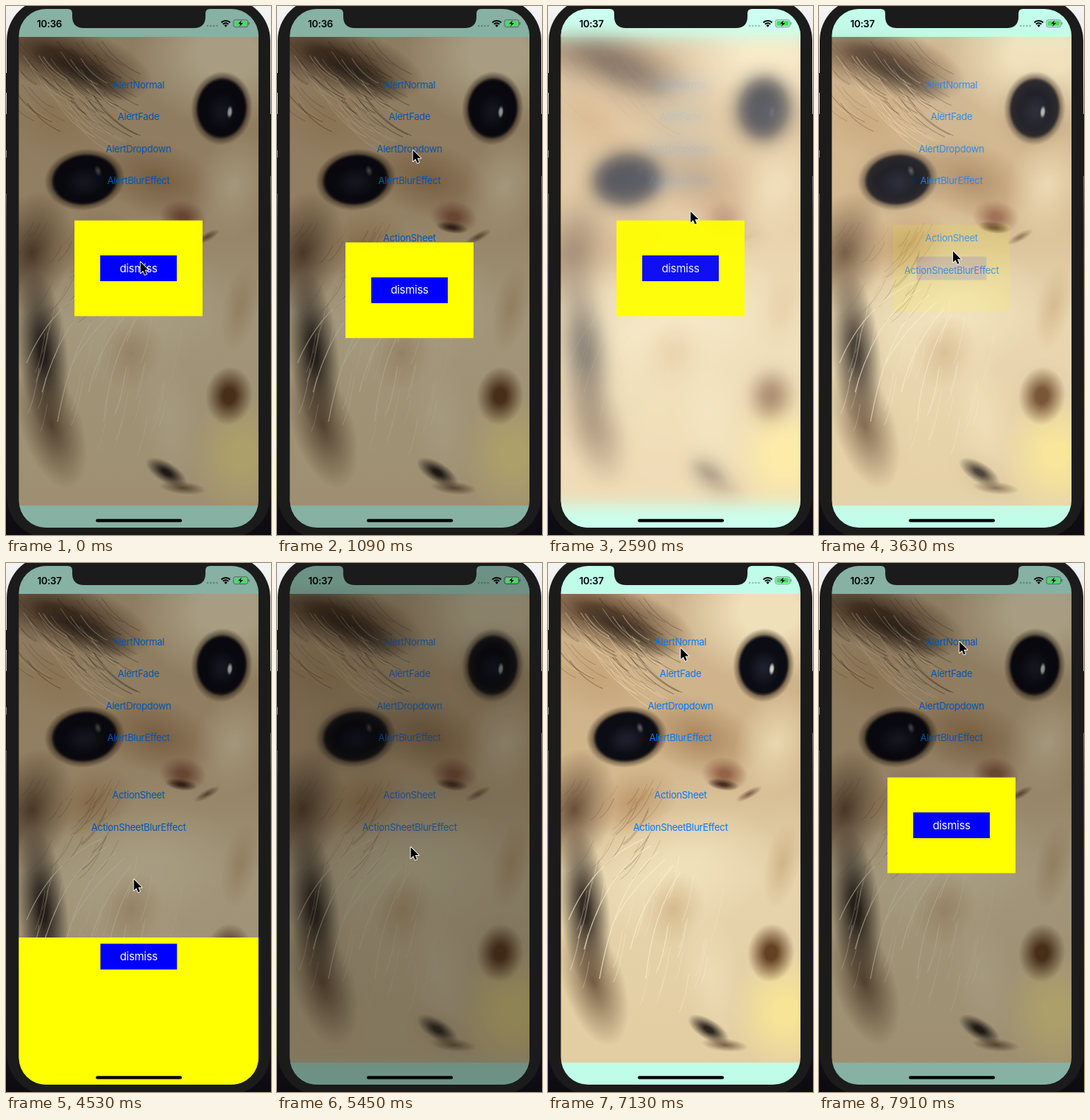
Recreate the animation shown at these times as an HTML page with a canvas. Size 360x719 px, loop 8 s.

```html
<!DOCTYPE html>
<html lang="en">
<head>
<meta charset="utf-8">
<title>Alert styles</title>
<style>
  html, body { margin: 0; width: 100%; height: 100%; overflow: hidden; background: #1b1b1b; }
  canvas { display: block; width: 360px; height: 719px; }
</style>
</head>
<body>
<canvas id="stage"></canvas>
<script>
const W = 360, H = 719, LOOP = 8000;
const DPR = window.devicePixelRatio || 1;
const FONT = 'Inter, Roboto, sans-serif';

function makeLayer(canvas = document.createElement('canvas')) {
  canvas.width = W * DPR;
  canvas.height = H * DPR;
  const g = canvas.getContext('2d');
  g.scale(DPR, DPR);
  return g;
}
const ctx = makeLayer(document.getElementById('stage'));

const clamp = v => Math.min(1, Math.max(0, v));
const ramp = (t, start, length) => clamp((t - start) / length);
const ease = u => u < 0.5 ? 2 * u * u : 1 - 2 * (1 - u) * (1 - u);
const mix = (a, b, u) => a + (b - a) * u;

function rounded(g, x, y, w, h, r) {
  g.beginPath();
  g.roundRect(x, y, w, h, r);
}
function label(g, text, x, y, size, color, weight = 400, align = 'center') {
  g.font = `${weight} ${size}px ${FONT}`;
  g.letterSpacing = '-0.3px';
  g.textAlign = align;
  g.fillStyle = color;
  g.fillText(text, x, y);
}

// ---- Kitten picture ----
let seed = 7;
function random() {
  seed = (seed * 16807) % 2147483647;
  return seed / 2147483647;
}
function blob(g, x, y, rx, ry, turn, rgb, alpha = 1, core = 0) {
  g.save();
  g.translate(x, y);
  g.rotate(turn);
  g.scale(rx, ry);
  const fill = g.createRadialGradient(0, 0, core, 0, 0, 1);
  fill.addColorStop(0, `rgba(${rgb},${alpha})`);
  fill.addColorStop(1, `rgba(${rgb},0)`);
  g.fillStyle = fill;
  g.fillRect(-1, -1, 2, 2);
  g.restore();
}
function hairs(g, count, x, y, w, h, dx, dy, color) {
  g.strokeStyle = color;
  for (let i = 0; i < count; i++) {
    const px = x + random() * w, py = y + random() * h, k = 0.5 + random();
    g.lineWidth = 0.5 + random() * 0.8;
    g.beginPath();
    g.moveTo(px, py);
    g.quadraticCurveTo(px + dx * k * 0.4, py + dy * k * 0.7, px + dx * k, py + dy * k);
    g.stroke();
  }
}
function eye(g, x, y, rx, ry, turn) {
  blob(g, x, y, rx * 1.2, ry * 1.2, turn, '48,34,24', 0.9, 0.72);
  blob(g, x, y, rx, ry, turn, '12,12,20', 1, 0.88);
  blob(g, x, y + ry * 0.1, rx * 0.6, ry * 0.6, turn, '38,42,58', 0.6, 0.2);
}
function drawKitten(g) {
  const cream = '240,224,186', tan = '196,160,114', brown = '92,66,44', dark = '44,36,30';
  g.save();
  g.beginPath();
  g.rect(0, 42, W, 637);
  g.clip();
  const base = g.createLinearGradient(0, 42, 0, 679);
  base.addColorStop(0, '#cbb18b');
  base.addColorStop(0.35, '#d1b58b');
  base.addColorStop(0.6, '#e6d4ad');
  base.addColorStop(1, '#e3cda2');
  g.fillStyle = base;
  g.fillRect(0, 42, W, 637);

  // forehead and cheeks
  blob(g, 300, 65, 130, 100, 0, cream, 1, 0.3);
  blob(g, 75, 70, 130, 48, 0.3, brown, 0.95, 0.2);
  blob(g, 105, 90, 80, 24, 0.45, dark, 0.8);
  blob(g, 65, 155, 85, 55, 0.4, tan, 0.8);
  blob(g, 205, 235, 90, 52, 0.35, '164,126,86', 0.85);
  blob(g, 310, 245, 55, 75, 0.3, cream, 0.8);
  blob(g, 35, 335, 55, 85, 0.25, brown, 0.9);
  blob(g, 115, 325, 65, 45, -0.4, '184,142,96', 0.8);

  // chest, flank and paw
  blob(g, 180, 420, 135, 85, -0.3, cream, 0.95, 0.2);
  blob(g, 50, 470, 34, 110, -0.1, dark, 0.95, 0.15);
  blob(g, 62, 570, 42, 90, -0.3, brown, 0.8);
  blob(g, 170, 470, 42, 52, 0.3, tan, 0.55);
  blob(g, 318, 410, 24, 60, 0.2, tan, 0.6);
  blob(g, 322, 610, 75, 85, 0, '250,232,148', 0.85, 0.2);
  blob(g, 222, 560, 42, 95, -0.15, cream, 0.7);
  blob(g, 303, 530, 32, 40, 0.1, '102,66,36', 1, 0.25);
  blob(g, 218, 634, 32, 14, 0.55, dark, 1, 0.2);
  blob(g, 240, 655, 32, 9, 0.1, brown, 0.8);

  // nose and mouth
  blob(g, 240, 287, 32, 23, 0.15, '142,91,66', 0.9, 0.2);
  blob(g, 238, 301, 22, 8, 0.15, '66,40,30', 0.95, 0.2);
  blob(g, 273, 314, 20, 6, -0.5, brown, 0.8);

  hairs(g, 55, 5, 45, 130, 90, 42, 36, 'rgba(60,42,28,.4)');
  hairs(g, 35, 5, 60, 110, 95, 45, 42, 'rgba(242,220,180,.45)');
  hairs(g, 30, 30, 290, 130, 100, -26, 36, 'rgba(112,82,52,.3)');
  hairs(g, 30, 35, 390, 210, 180, -12, 48, 'rgba(255,244,216,.4)');
  eye(g, 107, 236, 46, 35, -0.12);
  eye(g, 293, 139, 35, 42, 0.08);
  blob(g, 304, 144, 4, 9, 0.1, '225,225,215', 0.9, 0.4);
  blob(g, 125, 224, 5, 8, -0.3, '160,155,150', 0.6);

  // whiskers
  g.strokeStyle = 'rgba(250,238,208,.75)';
  g.lineWidth = 1.2;
  for (let i = 0; i < 6; i++) {
    g.beginPath();
    g.moveTo(130 + i * 10, 375 + i * 9);
    g.quadraticCurveTo(62 + i * 16, 405 + i * 14, 28 + i * 21, 485 + (i % 3) * 40);
    g.stroke();
  }
  g.restore();
}

const LINKS = [
  ['AlertNormal', 111.5], ['AlertFade', 155], ['AlertDropdown', 198.5],
  ['AlertBlurEffect', 242], ['ActionSheet', 320], ['ActionSheetBlurEffect', 363.5]
];
const scene = makeLayer();
scene.fillStyle = '#bffde9';
scene.fillRect(0, 0, W, H);
drawKitten(scene);
for (const [text, y] of LINKS) label(scene, text, 180, y, 13, '#007aff');

function frosted(radius, saturation, tint) {
  const g = makeLayer();
  g.drawImage(scene.canvas, 0, 0, W, H);
  g.filter = `blur(${radius * DPR}px) saturate(${saturation})`;
  g.drawImage(scene.canvas, 0, 0, W, H);
  g.filter = 'none';
  g.fillStyle = tint;
  g.fillRect(0, 0, W, H);
  return g.canvas;
}
const shades = {
  light: frosted(13, 1.3, 'rgba(255,255,255,.32)'),
  dark: frosted(11, 1.2, 'rgba(0,0,0,.75)')
};

// ---- Popups ----
const popups = [
  { style: 'pop', show: -1000, hide: 280 },
  { style: 'drop', show: 890, hide: 1730 },
  { style: 'fade', show: 2450, hide: 3440, shade: 'light', rise: 150 },
  { style: 'sheet', show: 4010, hide: 4730 },
  { style: 'sheet', show: 5450, hide: 6350, shade: 'dark', lead: 140, lag: 87, slide: 300 },
  { style: 'pop', show: 7450, hide: Infinity }
];

function drawShade({ show, hide, shade, rise = 250, lead = 0, lag = 0, style }, t) {
  const speed = style === 'drop' ? 180 : rise;
  const k = ramp(t, show - lead, speed) * (1 - ramp(t, hide + lag, 250));
  if (!k) return;
  ctx.globalAlpha = k;
  if (shade) ctx.drawImage(shades[shade], 0, 0, W, H);
  else {
    ctx.fillStyle = 'rgba(0,0,0,.3)';
    ctx.fillRect(0, 0, W, H);
  }
  ctx.globalAlpha = 1;
}

function drawButton(x, y) {
  ctx.fillStyle = '#0000ff';
  ctx.fillRect(x - 52, y - 17.5, 104, 35);
  label(ctx, 'dismiss', x, y + 5, 15, '#fff');
}

function drawAlert(dy, scale, alpha) {
  ctx.save();
  ctx.globalAlpha = alpha;
  ctx.translate(180, 356.5 + dy);
  ctx.scale(scale, scale);
  ctx.fillStyle = '#ffff00';
  ctx.fillRect(-87, -65, 174, 130);
  drawButton(0, 0);
  ctx.restore();
}

function drawSheet(dy) {
  ctx.fillStyle = '#ffff00';
  ctx.fillRect(17, 509 + dy, 327, 230);
  drawButton(180.3, 535 + dy);
}

// Underdamped spring from -1 to 0.
function spring(ms) {
  const decay = 0.0098, freq = 0.0131;
  return -Math.exp(-decay * ms) * (Math.cos(freq * ms) + decay / freq * Math.sin(freq * ms));
}
// Moves past the end value, then settles back.
function overshoot(ms, from, peak, end) {
  return ms < 250 ? mix(from, peak, ease(clamp(ms / 250)))
                  : mix(peak, end, ease(ramp(ms, 250, 200)));
}

function drawPopup({ style, show, hide, rise, slide = 250 }, t) {
  const ms = t - show, out = ease(ramp(t, hide, slide));
  if (ms < 0 || out === 1) return;
  const shrink = 1 - 0.1 * out;
  if (style === 'sheet') drawSheet(overshoot(ms, 200, -8.7, 0) + 202 * out);
  else if (style === 'drop') drawAlert(420 * spring(ms), shrink, 1 - out);
  else if (style === 'fade') drawAlert(0, shrink, clamp(ms / rise) * (1 - out));
  else drawAlert(0, overshoot(ms, 0.5, 1.05, 1) * shrink, clamp(ms / 250) * (1 - out));
}

// ---- Pointer: time, x, y ----
const pointerPath = [
  [0, 182, 347], [400, 182, 347], [650, 184, 200], [890, 184, 200], [1090, 184, 195],
  [1200, 184, 200], [1640, 184, 351], [1760, 184, 351], [2030, 190, 237],
  [2440, 190, 237], [2590, 193, 278], [2970, 185, 352], [3450, 185, 352],
  [3800, 178, 314], [4050, 178, 314], [4530, 173, 429], [4710, 173, 429],
  [5070, 180, 358], [5340, 180, 358], [5450, 181, 385], [6070, 178, 525],
  [6130, 177, 527], [6310, 177, 527], [6480, 184, 285], [7070, 179, 117],
  [7250, 181, 110], [7430, 181, 110], [7910, 190, 106], [LOOP, 190, 106]
];
function drawPointer(t) {
  const i = pointerPath.findIndex(p => p[0] > t);
  const [t0, x0, y0] = pointerPath[i - 1], [t1, x1, y1] = pointerPath[i];
  const u = ramp(t, t0, t1 - t0);
  ctx.save();
  ctx.translate(mix(x0, x1, u), mix(y0, y1, u));
  const arrow = new Path2D('M.7 1V16L4.2 12.8 6.6 18.4 9 17.3 6.6 11.8H11.5Z');
  ctx.lineJoin = 'round';
  ctx.lineWidth = 1.8;
  ctx.strokeStyle = '#fff';
  ctx.fillStyle = '#000';
  ctx.stroke(arrow);
  ctx.fill(arrow);
  ctx.restore();
}

// ---- Phone ----
function drawBody() {
  const desk = ctx.createLinearGradient(0, 0, 0, H);
  desk.addColorStop(0, '#f4f4f4');
  desk.addColorStop(0.12, '#e4e4e4');
  desk.addColorStop(0.4, '#3a3a3c');
  desk.addColorStop(1, '#0d0b12');
  ctx.fillStyle = desk;
  ctx.fillRect(0, 0, W, H);
  ctx.fillStyle = '#111';
  for (const [y, h] of [[91, 27], [147, 49], [206, 49]]) ctx.fillRect(0, y, 3, h);
  ctx.fillRect(357, 147, 3, 84);
  ctx.fillStyle = '#1b1b1b';
  rounded(ctx, 1, -10, 358, 733, 57);
  ctx.fill();
}

function drawStatus(t) {
  label(ctx, t < 1800 ? '10:36' : '10:37', 59, 28.5, 13.2, '#000', 600);
  ctx.fillStyle = 'rgba(0,0,0,.25)';
  for (let i = 0; i < 4; i++) {
    ctx.beginPath();
    ctx.arc(274 + i * 4.2, 27, 1.3, 0, 7);
    ctx.fill();
  }
  ctx.strokeStyle = '#000';
  ctx.lineWidth = 2;
  for (const r of [8.5, 5.2]) {
    ctx.beginPath();
    ctx.arc(298.5, 28.5, r, -Math.PI * 0.75, -Math.PI * 0.25);
    ctx.stroke();
  }
  ctx.fillStyle = '#000';
  ctx.beginPath();
  ctx.moveTo(298.5, 28.8);
  ctx.arc(298.5, 28.5, 3, -Math.PI * 0.75, -Math.PI * 0.25);
  ctx.fill();
  ctx.strokeStyle = 'rgba(0,0,0,.45)';
  ctx.lineWidth = 0.9;
  rounded(ctx, 309, 18.8, 19.5, 9.8, 2.6);
  ctx.stroke();
  ctx.fillStyle = '#4cd964';
  rounded(ctx, 310.5, 20.3, 16.5, 6.8, 1.4);
  ctx.fill();
  ctx.fillStyle = 'rgba(0,0,0,.45)';
  ctx.fillRect(329.4, 22, 1.2, 3.4);
  ctx.fillStyle = '#000';
  ctx.fill(new Path2D('M320 19.6L315.3 24.3H318.3L317.2 28L322 23.1H318.9Z'));
}

function drawNotch() {
  ctx.fillStyle = '#1b1b1b';
  ctx.fill(new Path2D('M84 3V4Q90 4 90 10V14Q90 30 106 30H255Q271 30 271 14V10Q271 4 277 4V3Z'));
}

function draw(t) {
  drawBody();
  ctx.save();
  rounded(ctx, 17.5, 4, 325.5, 705, 37);
  ctx.clip();
  ctx.drawImage(scene.canvas, 0, 0, W, H);
  for (const popup of popups) {
    drawShade(popup, t);
    drawPopup(popup, t);
  }
  drawStatus(t);
  ctx.fillStyle = '#000';
  rounded(ctx, 122, 697.3, 117, 4.2, 2.1);
  ctx.fill();
  ctx.restore();
  drawNotch();
  drawPointer(t);
}

const start = performance.now();
function tick() {
  draw((performance.now() - start) % LOOP);
  requestAnimationFrame(tick);
}
tick();
</script>
</body>
</html>
```
